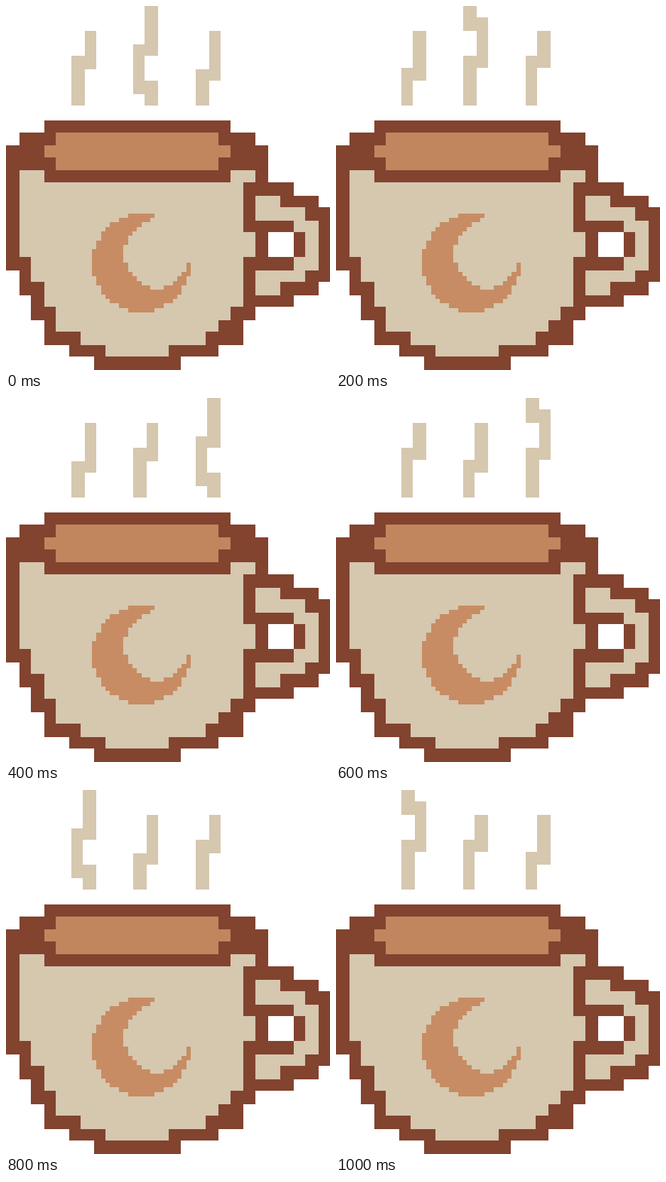
Animation of 456 by 512 pixels, one loop 1.2 s. Source, as an HTML page with a canvas:

```html
<!DOCTYPE html>
<html lang="en">
<head>
<meta charset="utf-8">
<title>Steaming cup</title>
<style>
  html, body { margin: 0; width: 100%; height: 100%; overflow: hidden; background: #fff; }
  canvas { display: block; width: 100%; height: 100%; }
</style>
</head>
<body>
<canvas id="cup" width="456" height="512"></canvas>
<script>
const ctx = document.getElementById('cup').getContext('2d');
const BROWN = '#82432f', CREAM = '#d6c7af', COFFEE = '#c1865e', MOON = '#c78c63', WHITE = '#fff';
const STEP = 200;
const PAIR = 35.09;             // width of two cells
const LONG = 18.55, SHORT = 16.35; // size of the first cell in a pair

const edge = (k, first, base = 0) => Math.round(base + (k >> 1) * PAIR + (k & 1) * first);
const colX = k => edge(k, LONG);
const rowY = k => edge(k, SHORT, 161.25);

function box(x0, y0, x1, y1) {
  ctx.fillRect(x0, y0, x1 - x0, y1 - y0);
}

// Blocks are [first row, end row, first column, end column]
function blocks(color, list, grow = 0) {
  ctx.fillStyle = color;
  for (const [r0, r1, c0, c1] of list) {
    box(colX(c0 - grow), rowY(r0 - grow), colX(c1 + grow), rowY(r1 + grow));
  }
}

// A filled shape with a border one cell thick
function outlined(color, list) {
  blocks(BROWN, list, 1);
  blocks(color, list);
}

function drawCup() {
  blocks(BROWN, [[1, 2, 1, 20], [2, 3, 0, 21], [16, 18, 3, 19]]);
  outlined(CREAM, [
    [4, 5, 1, 20], [5, 9, 1, 19], [9, 11, 1, 20], [11, 13, 2, 19], [13, 15, 3, 19],
    [15, 16, 4, 18], [16, 17, 4, 17], [17, 18, 6, 16], [18, 19, 8, 13]
  ]);
  // The handle mirrors top to bottom
  const arm = [[20, 22], [20, 24], [23, 25], [24, 25]];
  outlined(CREAM, arm.flatMap(([a, b], i) => [[6 + i, 7 + i, a, b], [13 - i, 14 - i, a, b]]));
  blocks(WHITE, [[9, 11, 21, 23]]);
  outlined(COFFEE, [[1, 4, 4, 17], [2, 3, 3, 18]]);
}

// Crescent: a disc with an oval bite, on a finer grid
function drawMoon() {
  const n = 22;
  const x = c => Math.round(121 + c * 6.32);
  const y = r => Math.round(291.5 + r * 6.34);
  ctx.fillStyle = MOON;
  for (let r = 0; r < n; r++) {
    for (let c = 0; c < n; c++) {
      const cx = c + 0.5, cy = r + 0.5;
      const disc = Math.hypot(cx - 11, cy - 11) < 10.85;
      const bite = Math.hypot((cx - 14.5) / 7.2, (cy - 9) / 7.6) < 1;
      if (disc && !bite) box(x(c), y(r), x(c + 1), y(r + 1));
    }
  }
}

// Each pose starts at a row and switches side at every bend
const poses = [
  { top: 0, bends: [3, 6], onRight: true },
  { top: 0, bends: [1, 4], onRight: false },
  { top: 2, bends: [4], onRight: true },
  { top: 2, bends: [5], onRight: true },
  { top: 2, bends: [5], onRight: true },
  { top: 2, bends: [4], onRight: true }
];
const plumes = [
  { col: 5, phase: 2 },
  { col: 10, phase: 0 },
  { col: 15, phase: 4 }
].map(({ col, phase }, i) => ({ left: 92 + Math.round(i * 87.3), phase }));

function drawSteam(step) {
  const odd = step % 2 === 1;
  const y = k => edge(k, odd ? SHORT : LONG);
  ctx.fillStyle = CREAM;
  for (const { left, phase } of plumes) {
    const { top, bends, onRight } = poses[(step + phase) % poses.length];
    const tall = top === 0;
    const seam = left + (odd === tall ? 19 : 16);
    const starts = [top, ...bends];
    starts.forEach((from, i) => {
      const to = i < bends.length ? bends[i] + 1 : 8;
      const right = onRight === (i % 2 === 0);
      box(right ? seam : left, y(from), right ? left + 35 : seam, y(to));
    });
  }
}

const start = performance.now();

function frame() {
  const t = Math.max(0, performance.now() - start);
  ctx.fillStyle = WHITE;
  ctx.fillRect(0, 0, 456, 512);
  drawCup();
  drawMoon();
  drawSteam(Math.floor(t / STEP) % poses.length);
  requestAnimationFrame(frame);
}
frame();
</script>
</body>
</html>
```
